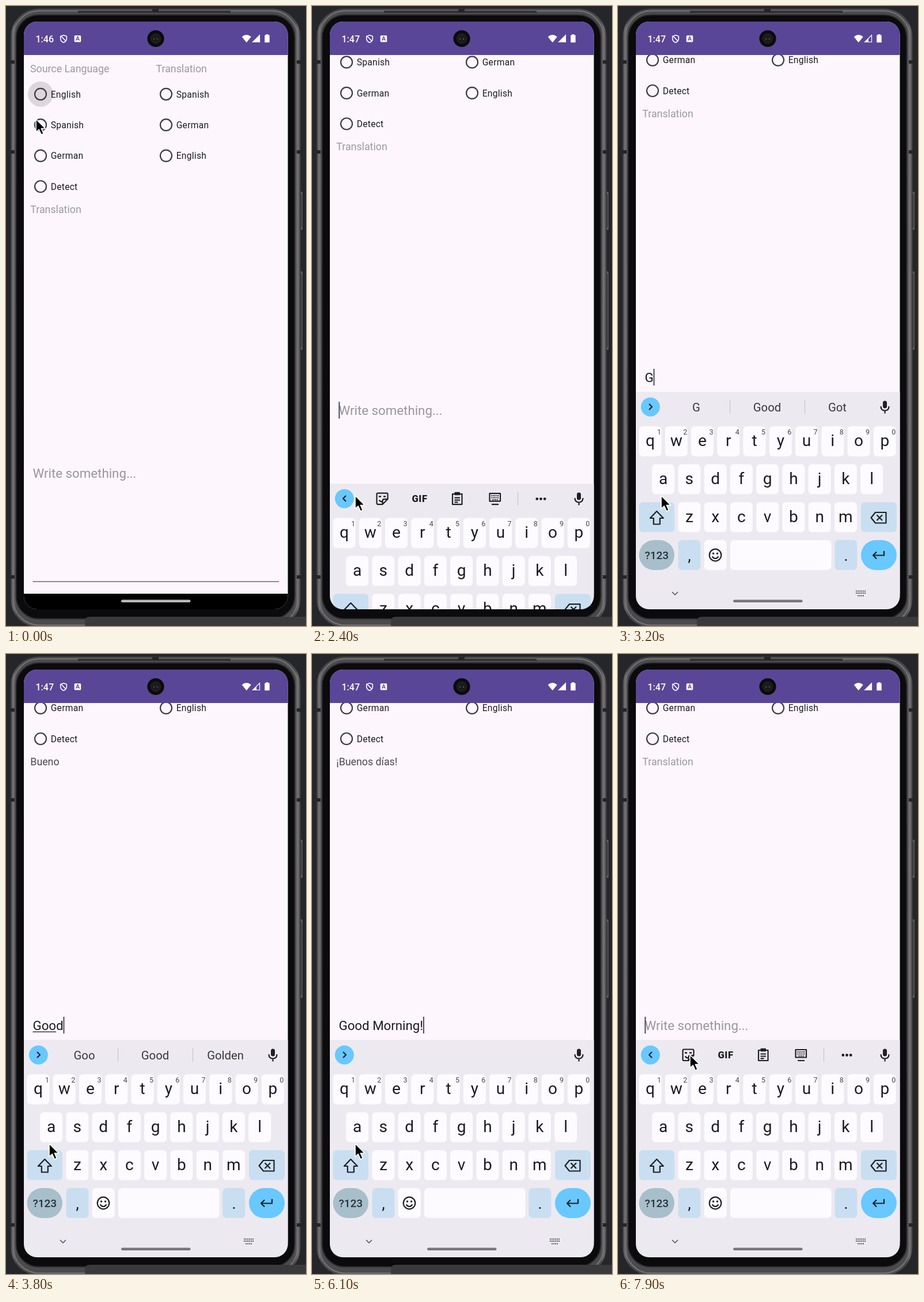
An HTML page for the animation above (8 s loop, 521x1075 px).

```html
<!DOCTYPE html>
<html lang="en">
<head>
<meta charset="utf-8">
<title>Translator demo</title>
<style>
html, body { margin: 0; width: 100%; height: 100%; overflow: hidden; background: #25262a; }
svg { display: block; width: 521px; height: 1075px; font-family: Roboto, sans-serif; }
text { white-space: pre; }
.head { font-size: 17.8px; fill: #9c989e; }
.label { font-size: 15.6px; letter-spacing: .28px; fill: #1d1b20; }
.field { font-size: 22.28px; fill: #1d1b20; }
.hint { fill: #99959b; }
.key { font-size: 28px; fill: #1a1b20; text-anchor: middle; }
.num { font-size: 12.5px; fill: #45464b; text-anchor: middle; }
.word { font-size: 20.3px; fill: #36373c; text-anchor: middle; }
.line { fill: none; stroke: #1f2024; stroke-width: 2.2; stroke-linejoin: round; }
</style>
</head>
<body>
<svg viewBox="0 0 521 1075">
  <defs>
    <linearGradient id="metal">
      <stop offset="0" stop-color="#3d3c3e"/><stop offset=".008" stop-color="#6f6d6f"/>
      <stop offset=".02" stop-color="#4b4a4c"/><stop offset=".98" stop-color="#4b4a4c"/>
      <stop offset=".992" stop-color="#6f6d6f"/><stop offset="1" stop-color="#3d3c3e"/>
    </linearGradient>
    <linearGradient id="dusk" x2="0" y2="1">
      <stop offset="0" stop-color="#6b2f63"/><stop offset=".45" stop-color="#d4513c"/><stop offset="1" stop-color="#f6a02c"/>
    </linearGradient>
    <clipPath id="screen"><rect x="31" y="27" width="458.5" height="1019" rx="23"/></clipPath>
    <clipPath id="page"><rect x="31" y="85" width="458.5" height="934"/></clipPath>
  </defs>

  <rect width="521" height="1075" fill="#25262a"/>
  <g fill="#5f5e60">
    <rect x="510" y="322" width="5" height="66" rx="1.5"/>
    <rect x="510" y="460" width="5" height="136" rx="1.5"/>
    <path d="M513 326v58M513 464v128" stroke="#39383a" stroke-width="1.5"/>
  </g>
  <rect x="8" y="4.500" width="503.500" height="1073" rx="49" fill="url(#metal)" stroke="#343335"/>
  <rect x="12.500" y="8.500" width="494" height="1065" rx="45" fill="none" stroke="#757375" stroke-width="2"/>
  <path d="M125 10H390" stroke="#29282a" stroke-width="3"/>
  <path d="M254 8h11M8 97h7M8 253h7M505 97h7M505 253h7M8 990h7M505 990h7" stroke="#252426" stroke-width="6"/>
  <rect x="17.500" y="15.500" width="484" height="1047" rx="39" fill="#0b0a0c" stroke="#2b2a2c" stroke-width="2"/>

  <g clip-path="url(#screen)">
    <rect x="31" y="27" width="459" height="1019" fill="#fdf7fd"/>
    <g clip-path="url(#page)">
      <g id="content">
        <text class="head" x="42" y="115.300">Source Language</text>
        <text class="head" x="260.500" y="115.300">Translation</text>
        <g id="radios"></g>
        <text class="head" id="result" x="42.300" y="358.800"></text>
        <text class="field" id="entry" x="46.500" y="818"></text>
        <rect id="under" y="820.500" height="1.300" fill="#1d1b20"/>
        <rect id="caret" y="795" width="2" height="29" fill="#454a5c"/>
        <path d="M46.500 998H474" stroke="#6c686e" stroke-width="1.500"/>
      </g>
    </g>
    <rect x="31" y="1019" width="459" height="28"/>
    <g id="board"></g>
    <rect id="handle" x="200" y="1029.500" width="120.500" height="4.500" rx="2.200"/>

    <rect x="31" y="27" width="459" height="58" fill="#5a4697"/>
    <text id="clock" x="51.500" y="62.700" font-size="16" font-weight="500" fill="#fff"></text>
    <path d="M100 50.500l5.300 2v4c0 3.200-2.200 5.700-5.300 7-3.100-1.300-5.300-3.800-5.300-7v-4zM96 52.500l8 8.500" fill="none" stroke="#fff" stroke-width="1.600"/>
    <rect x="118.700" y="51" width="11.500" height="11.500" rx="1.500" fill="#fff"/>
    <path d="M121.700 60l2.800-7h.2l2.700 7M122.700 57.900h3.600" fill="none" stroke="#5a4697" stroke-width="1.300"/>
    <path d="M409.700 53.500q8-6.800 16 0l-8 9.800z" fill="#fff"/>
    <path d="M440.500 50.500v12h-12z" fill="none" stroke="#fff" stroke-width="1.200"/>
    <path id="signal" fill="#fff"/>
    <path d="M451.500 49h4v1.500h2.200v12.800h-8.500v-12.800h2.300z" fill="#fff"/>
  </g>
  <circle cx="260" cy="56.500" r="14.600" fill="#0b0b0d"/>
  <circle cx="260" cy="56.500" r="8.500" fill="#1b1b1d" stroke="#29292b"/>
  <path d="M256 57h2M262 57h2" stroke="#55555a" stroke-width="2"/>

  <path id="dock" d="M137 1075v-8q0-8 8-8h376v16z" fill="#3a393c"/>
  <path id="pointer" d="M0 0V22.500L5.200 18 9.200 27 13.200 25.200 9.300 16.500H16.500z" stroke="#fff" stroke-width="1.600" stroke-linejoin="round"/>
</svg>
<script>
const LOOP = 8000, STEP = 100;
const PURPLE = '#5a4697', BLUE = '#68c8ff', PALE = '#c9dff1';
const $ = id => document.getElementById(id);
const clamp = v => Math.min(1, Math.max(0, v));
const rect = (x, y, w, h, rx, fill) =>
  `<rect x="${x}" y="${y}" width="${w}" height="${h}" rx="${rx}" fill="${fill}"/>`;
const text = (cls, x, y, s) => `<text class="${cls}" x="${x}" y="${y}">${s}</text>`;
const line = (d, extra = '') => `<path class="line" d="${d}" ${extra}/>`;
const bar = (x, y) => `<path d="M${x} ${y}v24" stroke="#c3c1c8"/>`;

// Radio buttons
const radios = [];
function addRadio(x, row, name, click = Infinity) {
  const y = 152.8 + row * 53.4;
  radios.push({ x, y, click });
  $('radios').insertAdjacentHTML('beforeend',
    `<circle cx="${x}" cy="${y}" r="22"/><circle cx="${x}" cy="${y}" fill="none"/>` +
    `<circle cx="${x}" cy="${y}" fill="${PURPLE}"/>` + text('label', x + 17.7, y + 5.7, name));
}
['English', 'Spanish', 'German', 'Detect'].forEach((s, i) => addRadio(60, i, s, i ? Infinity : 700));
['Spanish', 'German', 'English'].forEach((s, i) => addRadio(278, i, s, i ? Infinity : 1400));

// Keyboard
function buildBoard() {
  const pitch = 45.25, white = '#fdfbff';
  let s = rect(31, 669, 459, 420, 0, '#eceaf0');
  const row = (letters, x0, y, hints) => [...letters].forEach((c, i) => {
    const x = x0 + i * pitch;
    s += rect(x - 19.5, y, 39, 52, 6.5, white) + text('key', x, y + 34.5, c);
    if (hints) s += text('num', x + 15.5, y + 14, (i + 1) % 10);
  });
  row('qwertyuiop', 56, 728.7, true);
  row('asdfghjkl', 78.6, 794.5);
  row('zxcvbnm', 123.9, 860.3);
  s += rect(36.5, 860.3, 61.5, 52, 6.5, PALE) + rect(422, 860.3, 62, 52, 6.5, PALE)
    + rect(36.5, 926, 61.5, 52, 26, '#a8bfcb') + rect(104.4, 926, 39, 52, 6.5, PALE)
    + rect(149.7, 926, 39, 52, 6.5, white) + rect(195, 926, 175.5, 52, 6.5, white)
    + rect(376.3, 926, 39, 52, 6.5, PALE) + rect(422, 926, 62, 52, 26, BLUE)
    + '<text x="67.3" y="959" font-size="19" font-weight="500" text-anchor="middle" fill="#26323a">?123</text>'
    + text('key', 124, 962, ',') + text('key', 396, 962, '.')
    + line('M67.300 876l11.500 12h-6v10.500h-11v-10.500h-6z')
    + line('M447 878h18.500v18.500h-18.500l-7.500-9.200zM449.500 882.500l9.500 9.500M459 882.500l-9.500 9.500')
    + line('M462 945v7.500h-18.500M449 946.500l-6 6 6 6')
    + '<circle class="line" cx="169" cy="952" r="10.300"/>'
    + '<path d="M164 949.300h3M171 949.300h3" stroke="#1f2024" stroke-width="3"/>'
    + line('M163.500 954.500q5.500 7 11 0')
    + line('M94 1016l5 5 5-5', 'style="stroke:#5b5b61;stroke-width:1.700"')
    + '<path d="M413 1014.500h17M413 1018h17M416 1022.500h11" stroke="#5b5b61" stroke-width="2" stroke-dasharray="2 1"/>';
  s += `<circle cx="56.300" cy="695.200" r="16.500" fill="${BLUE}"/>` + line('', 'id="chevron"')
    + rect(460, 684.5, 7, 13, 3.5, '#1f2024') + line('M456.500 694q0 7.500 7 7.500t7-7.500M463.500 701.500v5')
    + '<g id="tools">'
    + line('M131.500 696v-8.500q0-2-2-2h-15q-2 0-2 2v15.500q0 2 2 2h8zM131.500 696h-6q-3 0-3 3v6M116.500 697.500q3 4 6 2.500')
    + '<path d="M116 691.500h4M124 691.500h4" stroke="#1f2024" stroke-width="2.600"/>'
    + '<text x="187" y="701" font-size="16.500" font-weight="900" letter-spacing=".6" text-anchor="middle" fill="#1f2024">GIF</text>'
    + line('M248 687h-4v18h16.500v-18h-4M247.500 693.500h9.500M247.500 697.500h9.500M247.500 701.300h6')
    + rect(247.5, 683.7, 9.5, 5.5, 1, '#1f2024')
    + line('M308.500 686h18.500v13.500h-18.500zM312 705h12')
    + '<path d="M311.500 690h13M311.500 693.500h13M313.500 697h9" stroke="#1f2024" stroke-width="2" stroke-dasharray="2 1.500"/>'
    + bar(357.5, 683)
    + [390.8, 397.5, 404.2].map(x => `<circle cx="${x}" cy="695.500" r="2.400" fill="#1f2024"/>`).join('')
    + '</g><g id="words">' + bar(194.5, 683) + bar(324.5, 683)
    + [136, 259, 381].map(x => text('word', x, 702.6, '')).join('')
    + '<g id="emoji">' + bar(382, 683)
    + '<circle cx="354" cy="695" r="9.700" fill="none" stroke="#f39a27" stroke-width="4" stroke-dasharray="4 3.600"/>'
    + '<circle cx="354" cy="695" r="8.300" fill="#fcc934"/>'
    + '<path d="M351 692v2.500M357 692v2.500M350 697q4 4 8 0" fill="none" stroke="#9a5a16" stroke-width="1.500"/>'
    + rect(400.5, 684.5, 22, 21.5, 1, 'url(#dusk)')
    + '<path d="M411.500 698v-11M411.500 698l-9-7M411.500 698l9-7" stroke="#f9bb45" stroke-width="1.500"/>'
    + '<circle cx="411.500" cy="698" r="5" fill="#ffe66a"/><path d="M400.500 706v-7l6-1.500 5 2 5-2 6 2v6.500z" fill="#653b35"/>'
    + '</g></g>';
  $('board').innerHTML = s;
}
buildBoard();
const slots = document.querySelectorAll('.word');

// Typing
const PHRASE = 'Good Morning!';
const KEYS = [3200, 3400, 3600, 3800, 4000, 4300, 4400, 4600, 4800, 5000, 5100, 5300, 5700];
const ERASE = 6500, HOLD = 6700, EMPTY = 7500;
function typed(t) {
  if (t < ERASE) return PHRASE.slice(0, KEYS.filter(k => k <= t).length);
  return PHRASE.slice(0, Math.ceil(12 * (1 - clamp((t - HOLD) / (EMPTY - HOLD)))));
}
const RESULTS = [
  [0, ''], [3300, 'G'], [3500, 'Ir'], [3700, 'Goo'], [3800, 'Bueno'], [4400, 'Bueno m'],
  [4500, 'Bueno mo'], [4700, 'Bueno mor'], [4900, 'Bueno morn'], [5200, 'Buenos días'],
  [5400, '¡Buenos días!'], [6600, 'Buenos días'], [6900, 'Bueno mor'], [7200, 'Bueno'],
  [7400, 'Ir'], [EMPTY, '']
];
const GUESSES = {
  'G': ['G', 'Good', 'Got'], 'Go': ['Go', 'Good', 'Going'], 'Goo': ['Goo', 'Good', 'Golden'],
  'Good': ['Good', 'Goods', 'Golden'], 'Good ': ['morning', 'luck', 'night'], 'Good M': ['M', 'My', 'Morning']
};
function guesses(s) {
  if (!s || s.endsWith('!')) return null;
  return GUESSES[s] || [s.slice(5), s.endsWith('g') ? 'Mornings' : 'Morning', ''];
}

// Pointer stops: time, x, y
const PATH = [
  [0, 52, 196], [200, 30, 186], [400, 24, 166], [600, 57, 152], [900, 57, 152], [1300, 276, 154],
  [1500, 276, 154], [1800, 105, 870], [2000, 75, 849], [EMPTY, 75, 849], [7800, 125, 695], [LOOP, 125, 695]
];
function pointerAt(t) {
  const i = PATH.findIndex(p => p[0] > t), a = PATH[i - 1], b = PATH[i];
  const p = (t - a[0]) / (b[0] - a[0]), e = p * p * (3 - 2 * p);
  return [a[1] + (b[1] - a[1]) * e, a[2] + (b[2] - a[2]) * e];
}

function drawRadios(t) {
  radios.forEach((r, i) => {
    const [halo, ring, dot] = $('radios').querySelectorAll(`circle:nth-of-type(n+${i * 3 + 1})`);
    const p = clamp((t - r.click) / 300), on = t >= r.click;
    const hole = on && p < .5 ? 9 - 16.5 * p : 8.9;
    ring.setAttribute('r', (11.1 + hole) / 2);
    ring.setAttribute('stroke-width', 11.1 - hole);
    ring.setAttribute('stroke', on ? PURPLE : '#3f3b43');
    dot.setAttribute('r', p < .5 ? 0 : 9 - 6.8 * (p - .5));
    let glow = 0;
    if (i === 0) glow = t < 200 ? .14 * (1 - t / 200) : t >= 600 && t < 1000 ? .12 : 0;
    else if (on && p < 1) glow = .05;
    halo.setAttribute('fill', on ? PURPLE : '#1d1b20');
    halo.setAttribute('opacity', glow);
  });
}

function drawEntry(t) {
  const entry = $('entry'), s = typed(t);
  entry.textContent = s || 'Write something...';
  entry.classList.toggle('hint', !s);
  const width = n => n ? entry.getSubStringLength(0, n) : 0;
  const end = width(s.length);

  const composing = t < ERASE && /\w$/.test(s);
  const from = s.lastIndexOf(' ') + 1, to = composing ? Math.max(from, typed(t - STEP).length) : from;
  $('under').setAttribute('x', 46.5 + width(from));
  $('under').setAttribute('width', width(to) - width(from));

  let touched = 2300;
  KEYS.forEach(k => { if (k <= t) touched = k; });
  if (t >= ERASE) touched = Math.min(t, EMPTY);
  $('caret').setAttribute('x', 46.3 + end);
  $('caret').setAttribute('opacity', t >= 2300 && (t - touched) % 1000 < 500 ? 1 : 0);
}

function drawBar(t) {
  const late = typed(t - 2 * STEP);
  const tools = t < KEYS[0] || t >= EMPTY;
  const list = tools || t >= ERASE || typed(t).endsWith('!') ? null : guesses(late || 'G');
  $('tools').style.display = tools ? '' : 'none';
  $('words').style.display = list ? '' : 'none';
  $('chevron').setAttribute('d', tools ? 'M59 690l-5 5 5 5' : 'M54 690l5 5-5 5');
  if (!list) return;
  slots.forEach((slot, i) => slot.textContent = list[i]);
  $('emoji').style.display = list[2] ? 'none' : '';
}

function draw(t) {
  const rest = 1 - clamp((t - 2300) / 400);
  $('content').setAttribute('transform', `translate(0 ${-166 * (1 - rest ** 3.7)})`);
  $('board').setAttribute('transform', `translate(0 ${rest === 1 ? 420 : 377 * rest ** 3})`);
  $('handle').setAttribute('fill', t < 600 ? '#b9b8ba' : t < 2400 ? '#f3f1f3' : '#77757b');
  $('handle').style.display = t >= 2400 && t < 2800 ? 'none' : '';
  $('clock').textContent = t < 600 ? '1:46' : '1:47';
  $('signal').setAttribute('d', t >= 2500 && t < 4200 ? 'M435 56.500v6h-6z' : 'M440.500 50.500v12h-12z');
  $('dock').style.display = t < 7700 ? '' : 'none';

  const result = RESULTS.filter(r => r[0] <= t).pop()[1];
  $('result').textContent = result || 'Translation';
  $('result').style.fill = result ? '#4a474d' : '';

  drawRadios(t);
  drawEntry(t);
  drawBar(t);
  $('pointer').setAttribute('transform', `translate(${pointerAt(t)})`);
}

const start = performance.now();
function tick(now) {
  draw(Math.floor(Math.max(0, now - start) % LOOP / STEP) * STEP);
  requestAnimationFrame(tick);
}
draw(0);
requestAnimationFrame(tick);
</script>
</body>
</html>
```
